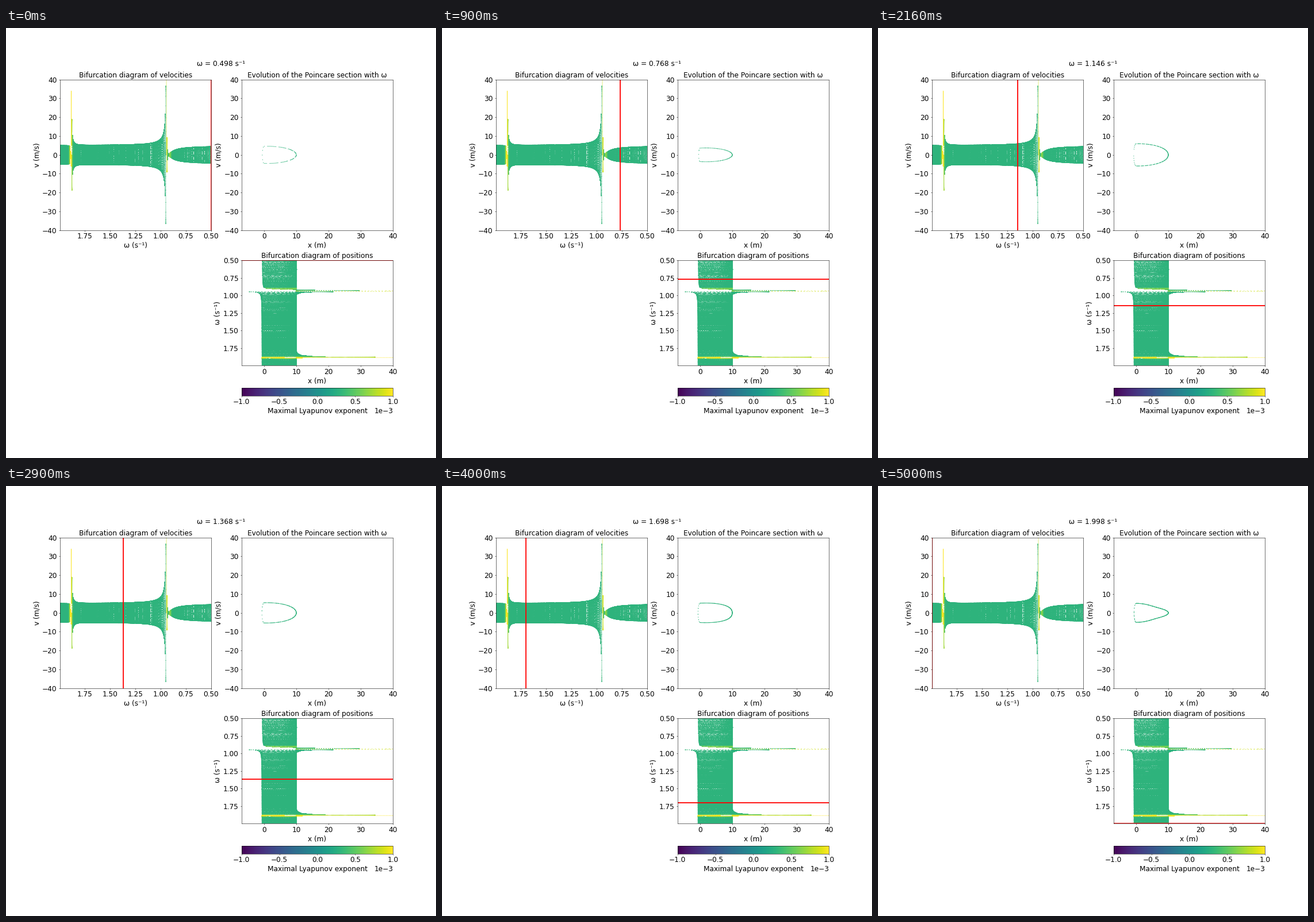
A matplotlib script that plays this animation: 748x748 px, repeating every 5020 ms.

```python
import numpy as np
import matplotlib.pyplot as plt
from matplotlib.animation import FuncAnimation

plt.rcParams.update({"font.family": "DejaVu Sans", "font.size": 17.5,
                     "axes.titlesize": "medium"})

SIZE, DPI = 748, 50
FRAMES = 251
DURATION, STEPS = 1000, 800
SOFT, STIFF, FORCE = 0.25, 64.0, 0.25

omega = 0.498 + 0.006 * np.arange(FRAMES)
W_MIN, W_MAX = omega[0], omega[-1]
counts = (DURATION * omega / (2 * np.pi)).astype(int) + 1


def poincare():
    """Driven bilinear oscillator, sampled once per forcing period."""
    x = np.full(FRAMES, 10.0)
    v = np.zeros(FRAMES)
    h = 2 * np.pi / omega / STEPS
    drive = FORCE * np.cos(2 * np.pi * (np.arange(STEPS) + 0.5) / STEPS)
    xs, vs = [x.copy()], [v.copy()]
    for _ in range(counts.max() - 1):
        x += h / 2 * v
        for f in drive:
            v += h * (f - np.minimum(SOFT * x, STIFF * x))
            x += h * v
        x -= h / 2 * v
        xs.append(x.copy())
        vs.append(v.copy())
    return np.array(xs).T, np.array(vs).T


def bump(center, width):
    return np.exp(-((omega - center) / width) ** 2)


xs, vs = poincare()
# Every run lasts equally long, so slow forcing gives fewer samples.
kept = np.arange(counts.max()) < counts[:, None]
lyap = 1e-3 * (0.29 + 0.8 * bump(1.889, 0.014) + 0.8 * bump(0.939, 0.005)
               + 0.35 * bump(0.908, 0.014))

fig, axes = plt.subplots(2, 2, figsize=(SIZE / DPI, SIZE / DPI), dpi=DPI)
(ax_v, ax_p), (ax_none, ax_x) = axes
ax_none.remove()


def setup(ax, title, xlabel, ylabel, xlim, ylim):
    ax.set(title=title, xlabel=xlabel, ylabel=ylabel, xlim=xlim, ylim=ylim)


W_LABEL, W_LIM = "ω (s⁻¹)", (W_MAX, W_MIN)
X_LABEL, X_LIM = "x (m)", (-7, 40)
V_LABEL, V_LIM = "v (m/s)", (-40, 40)
setup(ax_v, "Bifurcation diagram of velocities", W_LABEL, V_LABEL, W_LIM, V_LIM)
setup(ax_p, "Evolution of the Poincare section with ω", X_LABEL, V_LABEL, X_LIM, V_LIM)
setup(ax_x, "Bifurcation diagram of positions", X_LABEL, W_LABEL, X_LIM, W_LIM)

dots = dict(s=3, linewidths=0, cmap="viridis", vmin=-1e-3, vmax=1e-3)
ww = np.repeat(omega, counts)
cc = np.repeat(lyap, counts)
cloud_v = ax_v.scatter(ww, vs[kept], c=cc, **dots)
cloud_x = ax_x.scatter(xs[kept], ww, c=cc, **dots)

bar = fig.colorbar(cloud_x, ax=ax_x, orientation="horizontal",
                   label="Maximal Lyapunov exponent")
bar.formatter.set_powerlimits((0, 0))
bar.update_ticks()

# Bake the static parts into one backdrop so each frame draws fast.
for ax in (ax_v, ax_p, ax_x):
    ax.spines[:].set_visible(False)
fig.canvas.draw()
backdrop = np.array(fig.canvas.buffer_rgba())
cloud_v.remove()
cloud_x.set_visible(False)
bar.ax.set_visible(False)
for ax in (ax_v, ax_p, ax_x):
    ax.spines[:].set_visible(True)
    ax.patch.set_visible(False)
    ax.xaxis.set_visible(False)
    ax.yaxis.set_visible(False)
    ax.title.set_visible(False)
fig.figimage(backdrop, origin="upper", zorder=-1)

section = ax_p.scatter(xs[0], vs[0], c=np.full(xs.shape[1], lyap[0]), **dots)
line_v = ax_v.axvline(W_MIN, color="red", lw=2.6)
line_x = ax_x.axhline(W_MIN, color="red", lw=2.6)
label = fig.text(0.5, 1 - 66 / SIZE, "", ha="center", va="baseline")


def update(i):
    w, n = omega[i], counts[i]
    section.set_offsets(np.column_stack([xs[i, :n], vs[i, :n]]))
    section.set_array(np.full(n, lyap[i]))
    line_v.set_xdata([w, w])
    line_x.set_ydata([w, w])
    label.set_text(f"ω = {w:.3f} s⁻¹")
    return section, line_v, line_x, label


anim = FuncAnimation(fig, update, frames=FRAMES, interval=20, repeat=True)
plt.show()
```
